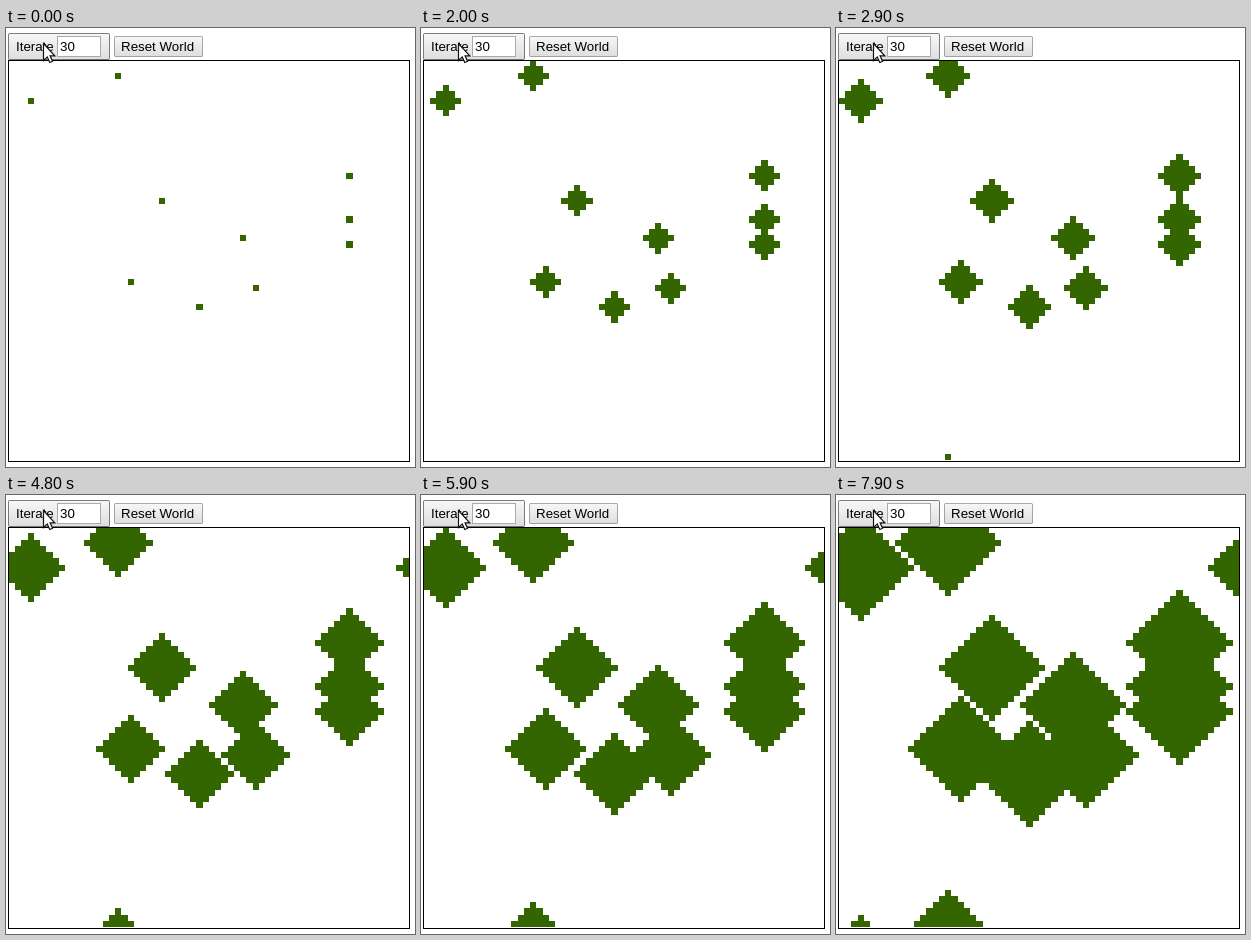
Animation, 409 px wide and 439 px high, one loop 8000 ms. Source, as an HTML page with a canvas:

```html
<!DOCTYPE html>
<html lang="en">
<head>
<meta charset="utf-8">
<title>Spreading cells</title>
<style>
  html, body { margin: 0; width: 100%; height: 100%; overflow: hidden; background: #fff; }
  canvas { display: block; }
</style>
</head>
<body>
<canvas id="stage" width="409" height="439"></canvas>
<script>
const ctx = document.getElementById('stage').getContext('2d');

const LOOP = 8000;
const GRID = 64;
const CELL = 400 / GRID;
const GROWTH = [800, 2000, 2900, 3800, 4800, 5900, 6800, 7900];
const PRESS = { from: 500, to: 600 };
const SEEDS = [
  [3, 6], [17, 2], [54, 18], [24, 22], [54, 25],
  [54, 29], [37, 28], [19, 35], [39, 36], [30, 39]
];

// Cell edges snap to whole pixels.
const edgeX = col => Math.round(2.9 + col * CELL);
const edgeY = row => Math.round(32.1 + row * CELL);
const wrap = n => (n + GRID) % GRID;

function fillCell(col, row) {
  const x = edgeX(col), y = edgeY(row);
  ctx.fillRect(x, y, edgeX(col + 1) - x, edgeY(row + 1) - y);
}

function drawDiamond([col, row], radius) {
  for (let dy = -radius; dy <= radius; dy++) {
    const reach = radius - Math.abs(dy);
    for (let dx = -reach; dx <= reach; dx++) fillCell(wrap(col + dx), wrap(row + dy));
  }
}

function drawWorld(time) {
  const radius = GROWTH.filter(start => time >= start).length;
  ctx.fillStyle = '#336600';
  SEEDS.forEach(seed => drawDiamond(seed, radius));
  ctx.strokeStyle = '#000';
  ctx.lineWidth = 1;
  ctx.strokeRect(2.5, 32.5, 401, 401);
}

function drawButton(x, y, w, h, borderAlpha, pressed) {
  const shade = ctx.createLinearGradient(0, y, 0, y + h);
  shade.addColorStop(pressed ? 1 : 0, '#f8f8f8');
  shade.addColorStop(pressed ? 0 : 1, '#dddddd');
  ctx.beginPath();
  ctx.roundRect(x + 0.5, y + 0.5, w - 1, h - 1, 1);
  ctx.fillStyle = shade;
  ctx.fill();
  ctx.strokeStyle = `rgba(0, 0, 0, ${borderAlpha})`;
  ctx.lineWidth = 1;
  ctx.stroke();
}

function drawLabel(text, x) {
  ctx.font = '13.333px "Liberation Sans", Arial, sans-serif';
  ctx.textBaseline = 'alphabetic';
  ctx.fillStyle = '#000';
  ctx.fillText(text, x, 23);
}

function drawControls(time) {
  const pressed = time >= PRESS.from && time < PRESS.to;
  drawButton(2, 5, 102, 27, 0.5, pressed);
  drawLabel('Iterate', 10);

  ctx.fillStyle = '#fff';
  ctx.fillRect(51, 8, 44, 21);
  ctx.strokeStyle = '#aaa';
  ctx.strokeRect(51.5, 8.5, 43, 20);
  drawLabel('30', 54);

  drawButton(108, 8, 89, 21, 0.33, false);
  drawLabel('Reset World', 115);
}

function drawPointer() {
  const arrow = new Path2D('M37.5 15.5V32.5L41.3 28.9L43.8 34.5L46.6 33.3L44.1 27.8H48.8Z');
  ctx.fillStyle = '#fff';
  ctx.fill(arrow);
  ctx.strokeStyle = '#111';
  ctx.lineWidth = 1.2;
  ctx.stroke(arrow);
}

function draw(now) {
  const time = now % LOOP;
  ctx.fillStyle = '#fff';
  ctx.fillRect(0, 0, 409, 439);
  drawWorld(time);
  drawControls(time);
  drawPointer();
}

let start;
function tick(now) {
  start ??= now;
  draw(now - start);
  requestAnimationFrame(tick);
}

draw(0);
requestAnimationFrame(tick);
</script>
</body>
</html>
```
